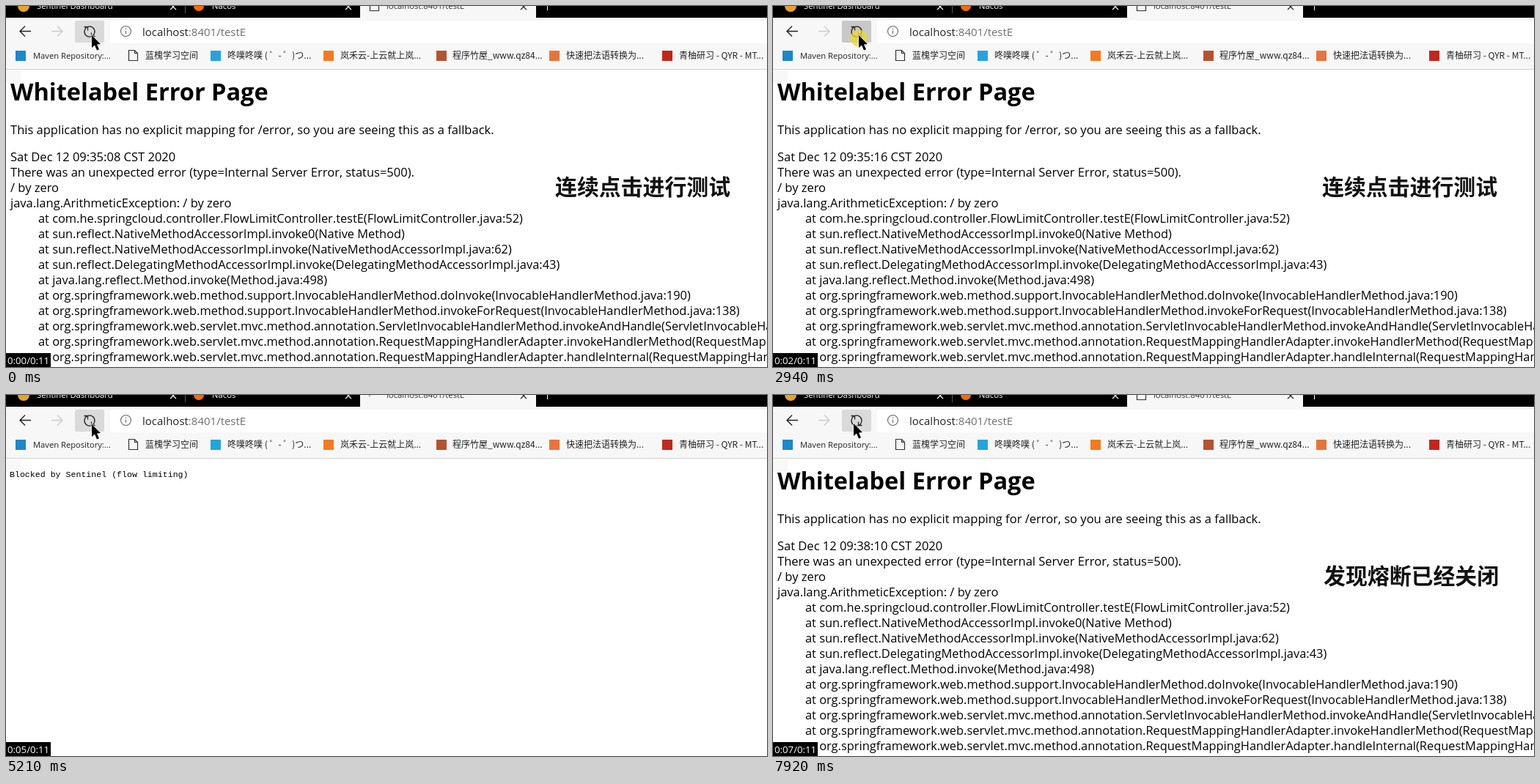
Animation, 1038 px wide and 493 px high, one loop 8 s. Source, as an HTML page with a canvas:

```html
<!DOCTYPE html>
<html lang="zh-CN">
<head>
<meta charset="utf-8">
<title>Error page refresh</title>
<style>
html, body { margin: 0; width: 100%; height: 100%; overflow: hidden; background: #fff; }
canvas { display: block; }
</style>
</head>
<body>
<canvas id="stage" width="1038" height="493"></canvas>
<script>
const ctx = document.getElementById('stage').getContext('2d');
const LOOP = 8000;
const SANS = '"Open Sans", "Noto Sans", sans-serif';
const CJK = '"Noto Sans CJK SC", "Noto Sans CJK", sans-serif';
const MONO = '"Liberation Mono", monospace';

// Button pressed, button released, page loaded
const clicks = [
  [440, 760, 850], [1310, 1470, 1550], [1860, 2160, 2250], [2870, 3040, 3120],
  [3640, 3720, 3810], [4590, 4660, 4750], [5060, 5210, 5300], [5680, 5830, 6080],
  [7300, 7450, 7530]
];
// Clock of the error page; an empty value is the blocked page
const pages = [
  [0, '35:08'], [850, '35:14'], [1550, '35:15'], [2250, '35:16'], [3120, '35:17'],
  [3810, ''], [6080, '38:09'], [7530, '38:10']
];
const captions = [
  [0, '连续点击进行测试', 749], [2950, '', 0], [3880, '当点击超过5次之后，服务发生熔断', 522],
  [5060, '', 0], [6160, '发现熔断已经关闭', 751]
];
const seconds = [[0, 0], [1000, 1], [2010, 2], [3000, 3], [3960, 4], [4980, 5], [6000, 6], [7000, 7]];
const pointerPath = [
  [0, 117, 40], [5830, 117, 40], [5900, 113, 38], [6200, 113, 38], [6520, 114, 66],
  [6840, 114, 66], [6910, 113, 56], [7080, 110, 40], [7900, 110, 40], [7920, 110, 39], [8000, 110, 39]
];

const handler = 'org.springframework.web.method.support.InvocableHandlerMethod';
const servlet = 'org.springframework.web.servlet.mvc.method.annotation.';
const trace = [
  'com.he.springcloud.controller.FlowLimitController.testE(FlowLimitController.java:52)',
  'sun.reflect.NativeMethodAccessorImpl.invoke0(Native Method)',
  'sun.reflect.NativeMethodAccessorImpl.invoke(NativeMethodAccessorImpl.java:62)',
  'sun.reflect.DelegatingMethodAccessorImpl.invoke(DelegatingMethodAccessorImpl.java:43)',
  'java.lang.reflect.Method.invoke(Method.java:498)',
  handler + '.doInvoke(InvocableHandlerMethod.java:190)',
  handler + '.invokeForRequest(InvocableHandlerMethod.java:138)',
  servlet + 'ServletInvocableHandlerMethod.invokeAndHandle(ServletInvocableHandlerMethod.java:105)',
  servlet + 'RequestMappingHandlerAdapter.invokeHandlerMethod(RequestMappingHandlerAdapter.java:878)',
  servlet + 'RequestMappingHandlerAdapter.handleInternal(RequestMappingHandlerAdapter.java:792)'
];

const current = (list, t) => list.findLast(entry => entry[0] <= t);

function text(str, x, y, font, color = '#000') {
  ctx.font = font;
  ctx.fillStyle = color;
  ctx.fillText(str, x, y);
}

function rect(x, y, w, h, color, radius = 0) {
  ctx.fillStyle = color;
  ctx.beginPath();
  ctx.roundRect(x, y, w, h, radius);
  ctx.fill();
}

function disc(x, y, r, color) {
  ctx.fillStyle = color;
  ctx.beginPath();
  ctx.arc(x, y, r, 0, 7);
  ctx.fill();
}

function stroke(path, color, width = 1.2) {
  ctx.strokeStyle = color;
  ctx.lineWidth = width;
  ctx.stroke(new Path2D(path));
}

function pageIcon(x, y) {
  stroke(`M${x} ${y}h8l4 4v10h-12zM${x + 8} ${y}v4h4`, '#333');
}

function drawTabs(loading) {
  rect(0, 0, 1038, 16, '#000');
  rect(483, 0, 240, 16, '#f7f7f7');
  const font = `11.3px ${SANS}`;
  disc(24, 0, 8, '#e9a32b');
  text('Sentinel Dashboard', 42, 4, font, '#fff');
  disc(263, 0, 7, '#ff6a00');
  text('Nacos', 281, 4, font, '#fff');
  text('localhost:8401/testE', 519, 4, font, '#333');
  if (loading) disc(496, 1, 1.5, '#bbb');
  else pageIcon(496.5, -7.5);
  for (const x of [228, 467, 706]) {
    stroke(`M${x - 4} -3l8 8m0 -8l-8 8`, x === 706 ? '#222' : '#fff');
  }
  stroke('M244.5 0v10', '#555', 1);
  stroke('M738.5 0v6', '#fff', 1);
}

function drawToolbar(hover, pressed) {
  rect(0, 16, 1038, 70, '#f7f7f7');
  rect(0, 86, 1038, 1, '#d2d2d2');
  rect(142, 20, 920, 31, '#fff', 4);
  if (hover) rect(94, 20, 40, 30, pressed ? '#c8c8c8' : '#dadada', 2);
  stroke('M34 34.5H19m7 -7l-7 7l7 7', '#222', 1.4);
  stroke('M62 34.5h15m-7 -7l7 7l-7 7', '#ccc', 1.4);
  stroke('M109 40A7.3 7.3 0 0 1 111 28.5M106.5 28.5h5v5M119 30A7.3 7.3 0 0 1 117 41.5M121.5 41.5h-5v-5M111 28.5A7.3 7.3 0 0 1 119 30M109 40A7.3 7.3 0 0 0 117 41.5', '#222', 1.3);
  stroke('M156.5 34.5a7 7 0 1 0 14 0a7 7 0 1 0 -14 0M163.5 33.5v4.5M163.5 30.5v1.5', '#666', 1.1);

  const urlFont = `15px ${SANS}`;
  text('localhost', 186, 41, urlFont, '#222');
  text(':8401/testE', 186 + ctx.measureText('localhost').width, 41, urlFont, '#707070');

  const font = `12px ${CJK}`;
  rect(13, 61, 14, 14, '#1c87c9');
  text('Maven Repository:...', 37, 72, `11.2px ${SANS}`, '#222');
  pageIcon(167.5, 60.5);
  text('蓝槐学习空间', 190, 72, font, '#222');
  const bookmarks = [
    [278, '#24a4dc', '咚噗咚噗 ( ゜- ゜)つ...', 302],
    [432, '#f47a20', '岚禾云-上云就上岚...', 456],
    [586, '#b5532f', '程序竹屋_www.qz84...', 609],
    [740, '#e8743b', '快速把法语转换为...', 764],
    [894, '#c3271b', '青柚研习 - QYR - MT...', 918]
  ];
  for (const [x, color, label, labelX] of bookmarks) {
    rect(x + 1, 61, 14, 14, color);
    text(label, labelX, 72, font, '#222');
  }
}

function drawErrorPage(clock) {
  const font = `16.5px ${SANS}`;
  text('Whitelabel Error Page', 6, 129, `bold 32.5px ${SANS}`);
  text('This application has no explicit mapping for /error, so you are seeing this as a fallback.', 6, 175, font);
  const summary = [
    `Sat Dec 12 09:${clock} CST 2020`,
    'There was an unexpected error (type=Internal Server Error, status=500).',
    '/ by zero',
    'java.lang.ArithmeticException: / by zero'
  ];
  summary.forEach((line, i) => text(line, 6, 212 + i * 21, font));
  trace.forEach((line, i) => text('at ' + line, 44, 296 + i * 21, `16.4px ${SANS}`));
}

function pointerAt(t) {
  const i = pointerPath.findIndex(point => point[0] > t);
  const [t0, x0, y0] = pointerPath[i - 1];
  const [t1, x1, y1] = pointerPath[i];
  const k = (t - t0) / (t1 - t0);
  return [x0 + (x1 - x0) * k, y0 + (y1 - y0) * k];
}

function drawPointer(x, y) {
  ctx.save();
  ctx.translate(x, y);
  const shape = new Path2D('M0 0V17L4 13.5L7 20.5L10 19.2L7 12.5L12 12Z');
  ctx.strokeStyle = 'rgba(255,255,255,.7)';
  ctx.lineWidth = 1.4;
  ctx.stroke(shape);
  ctx.fillStyle = '#000';
  ctx.fill(shape);
  ctx.restore();
}

function draw(t) {
  const pressed = clicks.some(([down, up]) => t >= down && t < up);
  const loading = clicks.some(([, up, done]) => t >= up && t < done);
  const [x, y] = pointerAt(t);

  rect(0, 0, 1038, 493, '#fff');
  drawTabs(loading);
  drawToolbar(y < 50, pressed);
  rect(0, 88, 20, 17, '#f8f8f8');

  const clock = current(pages, t)[1];
  if (clock) drawErrorPage(clock);
  else text('Blocked by Sentinel (flow limiting)', 5, 112, `11.6px ${MONO}`);

  const [, caption, captionX] = current(captions, t);
  text(caption, captionX, 258, `bold 29.9px ${CJK}`, '#111');

  rect(0, 474, 61, 19, '#000');
  text(`0:0${current(seconds, t)[1]}/0:11`, 2, 489, `13.2px ${SANS}`, '#fff');

  if (pressed) disc(x, y + 4, 11.5, 'rgba(238,216,40,.72)');
  drawPointer(x, y);
}

function tick() {
  draw(performance.now() % LOOP);
  requestAnimationFrame(tick);
}
tick();
</script>
</body>
</html>
```
